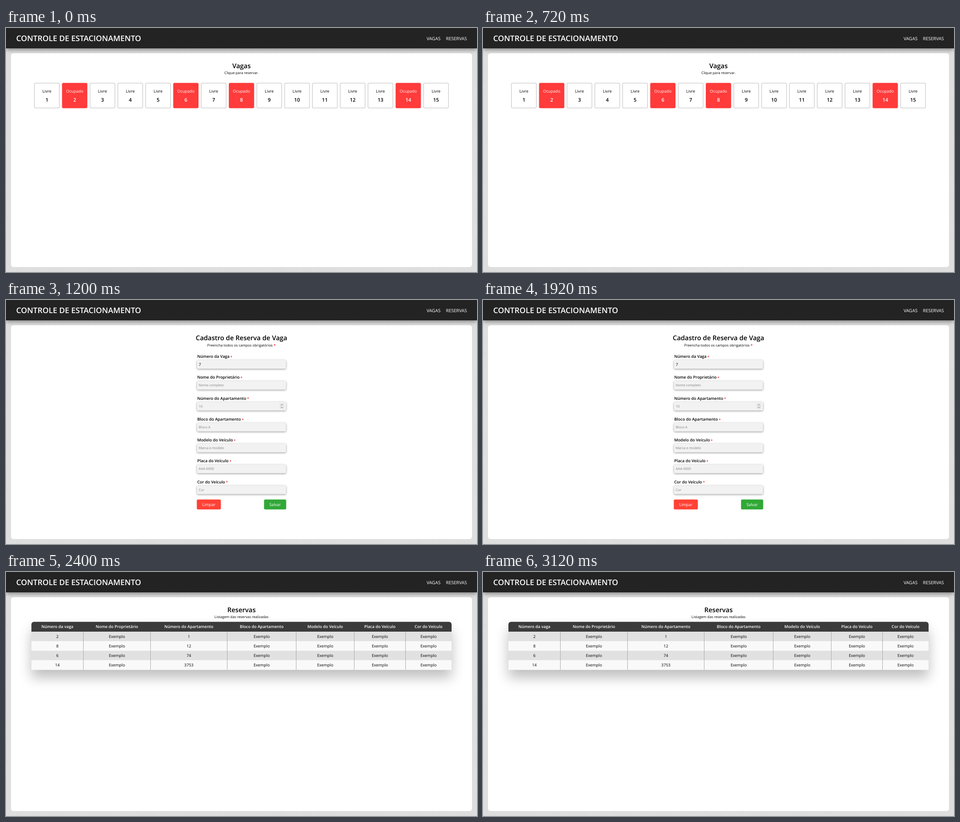
These frames come from a looping animation (1038x540 px, 3600 ms). An HTML page with a canvas:

```html
<!DOCTYPE html>
<html lang="pt-BR">
<head>
<meta charset="utf-8">
<title>Controle de Estacionamento</title>
<style>
html, body { margin: 0; width: 100%; height: 100%; overflow: hidden; background: #dedede; }
canvas { display: block; }
</style>
</head>
<body>
<canvas id="stage" width="1038" height="540"></canvas>
<script>
const ctx = document.getElementById('stage').getContext('2d');
const FAMILY = '"Open Sans", "Noto Sans", sans-serif';
const SCENE_MS = 1200;
const BODY = 8.9, SMALL = 7.8, HEADING = 14.5;

function text(str, x, y, size, { weight = 400, color = '#000', align = 'center' } = {}) {
  ctx.font = `${weight} ${size}px ${FAMILY}`;
  ctx.textRendering = 'geometricPrecision';
  ctx.textAlign = align;
  ctx.fillStyle = color;
  ctx.fillText(str, x, y);
  return ctx.measureText(str).width;
}

function box(x, y, w, h, r, fill, shadow) {
  ctx.save();
  if (shadow) {
    ctx.shadowOffsetY = shadow.y;
    ctx.shadowBlur = shadow.blur;
    ctx.shadowColor = `rgba(0,0,0,${shadow.alpha})`;
  }
  ctx.beginPath();
  ctx.roundRect(x, y, w, h, r);
  ctx.fillStyle = fill;
  ctx.fill();
  ctx.restore();
}

// Faint paper grain from a seeded generator
function makeGrain() {
  const tile = document.createElement('canvas');
  tile.width = tile.height = 100;
  const c = tile.getContext('2d');
  const img = c.createImageData(100, 100);
  let seed = 7;
  for (let i = 0; i < img.data.length; i += 4) {
    seed = (seed * 1664525 + 1013904223) >>> 0;
    const v = 219 + Math.floor(seed / 4294967296 * 7);
    img.data.set([v, v, v, 255], i);
  }
  c.putImageData(img, 0, 0);
  return ctx.createPattern(tile, 'repeat');
}
const grain = makeGrain();

function drawShell() {
  ctx.fillStyle = grain;
  ctx.fillRect(0, 0, 1038, 540);
  box(0, 0, 1038, 45, 0, '#232323', { y: 2, blur: 10, alpha: 0.5 });
  text('CONTROLE DE ESTACIONAMENTO', 22.5, 29, 17.1, { weight: 600, color: '#fff', align: 'left' });
  text('VAGAS', 957.7, 26.8, 10, { color: '#fff', align: 'right' });
  text('RESERVAS', 1015.8, 26.8, 10, { color: '#fff', align: 'right' });
  box(11, 56, 1016, 473, 5.5, '#fff');
}

function drawHeading(title, subtitle, y) {
  text(title, 519, 88.5, HEADING, { weight: 600 });
  if (subtitle) text(subtitle, 519, y, SMALL);
}

function drawSpots() {
  drawHeading('Vagas', 'Clique para reservar.', 102.4);
  const taken = [2, 6, 8, 14];
  for (let n = 1; n <= 15; n++) {
    const x = 62.2 + (n - 1) * 61.26;
    const busy = taken.includes(n);
    const color = busy ? '#fff' : '#000';
    box(x, 121.5, 55.8, 56, 3, busy ? '#ff3b3b' : '#bcbcbc');
    if (!busy) box(x + 1, 122.5, 53.8, 54, 2, '#fff');
    text(busy ? 'Ocupado' : 'Livre', x + 27.9, 142.6, BODY, { color });
    text(n, x + 27.9, 162.9, 11.1, { weight: 600, color });
  }
}

function drawSpinner(x, y) {
  box(x - 5, y - 6, 10, 12, 1, '#e6e6e6');
  ctx.strokeStyle = '#666';
  ctx.lineWidth = 0.9;
  for (const d of [-1, 1]) {
    ctx.beginPath();
    ctx.moveTo(x - 2, y + d * 2);
    ctx.lineTo(x, y + d * 4);
    ctx.lineTo(x + 2, y + d * 2);
    ctx.stroke();
  }
}

const fields = [
  ['Número da Vaga', '7'],
  ['Nome do Proprietário', 'Nome completo'],
  ['Número do Apartamento', '10'],
  ['Bloco do Apartamento', 'Bloco A'],
  ['Modelo do Veículo', 'Marca e modelo'],
  ['Placa do Veículo', 'AAA-0000'],
  ['Cor do Veículo', 'Cor'],
];

function drawForm() {
  drawHeading('Cadastro de Reserva de Vaga');
  text('Preencha todos os campos obrigatórios', 443.5, 103.4, SMALL, { align: 'left' });
  text('*', 589.5, 104.4, BODY, { color: '#f00', align: 'left' });
  fields.forEach(([label, value], i) => {
    const y = 133 + i * 46.25;
    const w = text(label, 421.5, y - 4.8, BODY, { weight: 600, align: 'left' });
    text('*', 421.5 + w + 2, y - 4.2, 7.4, { weight: 600, color: '#f00', align: 'left' });
    box(421, y, 196, 19, 2, '#f2f2f2', { y: 1.2, blur: 4, alpha: 0.4 });
    if (i === 0) text(value, 424.8, y + 12.5, BODY, { align: 'left' });
    else text(value, 424.8, y + 12.2, 7.4, { color: '#808080', align: 'left' });
    if (i === 2) drawSpinner(608, y + 9.3);
  });
  box(420.5, 441.5, 53, 22, 2.8, '#ff4136');
  box(568.7, 441.5, 48.8, 22, 2.8, '#31a837');
  text('Limpar', 447, 455.8, BODY, { color: '#fff' });
  text('Salvar', 593, 455.8, BODY, { color: '#fff' });
}

const edges = [56, 170.5, 318.5, 487.5, 639.5, 767.5, 880.5, 982];
const heads = ['Número da vaga', ...fields.slice(1).map(f => f[0])];
const bookings = [['2', '1'], ['8', '12'], ['6', '74'], ['14', '3753']];

function drawTable() {
  drawHeading('Reservas', 'Listagem das reservas realizadas', 102.4);
  box(56, 110.3, 926, 106, [5.5, 5.5, 0, 0], '#fff', { y: 18, blur: 28, alpha: 0.25 });
  box(56, 110.3, 926, 21.7, [5.5, 5.5, 0, 0], '#3b3b3b');
  const mid = i => (edges[i] + edges[i + 1]) / 2;
  heads.forEach((h, i) => text(h, mid(i), 124.2, BODY, { weight: 600, color: '#fff' }));
  bookings.forEach(([spot, flat], r) => {
    const y = 132 + r * 21.1;
    box(56, y, 926, 21.1, 0, r % 2 ? '#f9f9f9' : '#e1e1e1');
    heads.forEach((_, i) => {
      const value = i === 0 ? spot : i === 2 ? flat : 'Exemplo';
      text(value, mid(i), y + 13.6, BODY);
    });
  });
  ctx.fillStyle = '#aaa';
  for (const x of edges.slice(1, -1)) ctx.fillRect(x - 0.5, 132, 1, 84.4);
}

const scenes = [drawSpots, drawForm, drawTable];

function frame(now) {
  drawShell();
  scenes[Math.floor(now / SCENE_MS) % scenes.length]();
  requestAnimationFrame(frame);
}
frame(performance.now());
</script>
</body>
</html>
```
